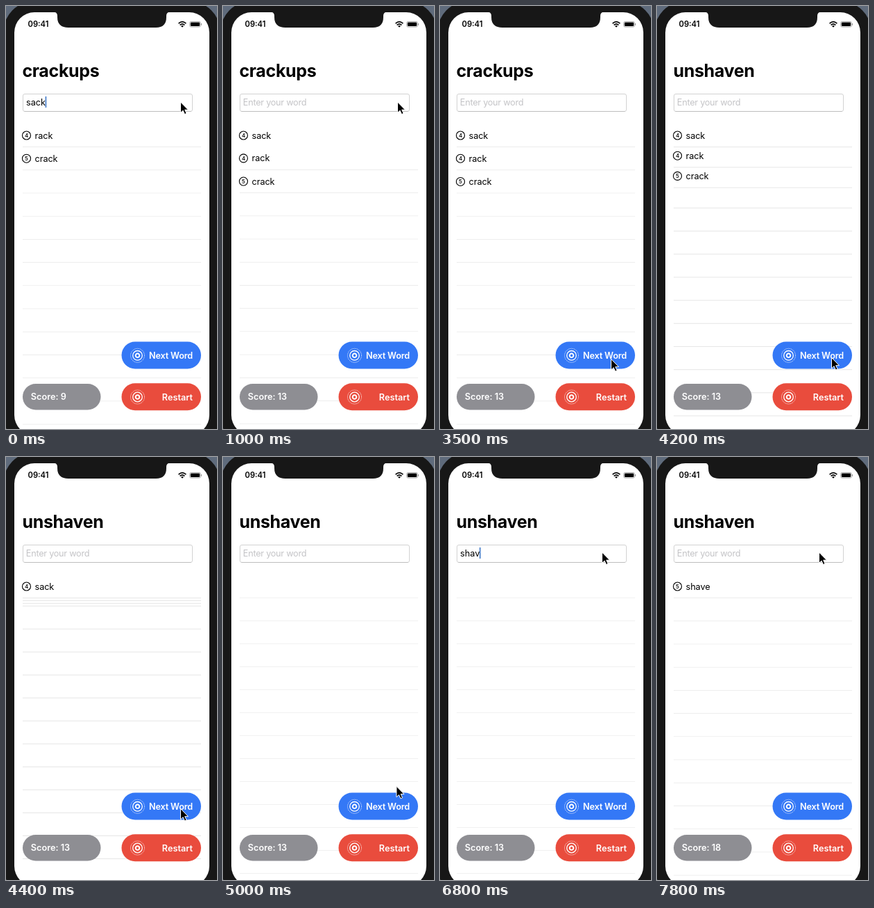
Recreate the animation shown at these times as an HTML page. Size 304 by 608 pixels, loop 8000 ms.

```html
<!DOCTYPE html>
<html lang="en">
<head>
<meta charset="utf-8">
<title>Word game</title>
<style>
  html, body { margin: 0; width: 100%; height: 100%; overflow: hidden; background: #5f6b7c; }
  svg { display: block; width: 304px; height: 608px; }
  text { font: 12.7px Inter, "Open Sans", sans-serif; white-space: pre; }
  #title { font-size: 25px; font-weight: 700; letter-spacing: -.32px; }
  #hint { fill: #c4c4c7; letter-spacing: -.26px; }
  .label { fill: #fff; font-weight: 600; }
  .end { text-anchor: end; }
  .badge { font-size: 8px; font-weight: 500; text-anchor: middle; }
  .ring { fill: none; stroke: #fff; }
</style>
</head>
<body>
<svg viewBox="0 0 304 608">
  <defs>
    <g id="target" class="ring">
      <circle r="2.8" stroke-width="1.9"/>
      <circle r="6.8" stroke-width="1.3"/>
      <circle r="10" stroke-width="1" stroke-dasharray="1 1.1"/>
    </g>
  </defs>
  <rect width="304" height="608" fill="#5f6b7c"/>
  <rect x="-4" y="-7" width="313" height="640" rx="45" fill="#171717"/>
  <rect x="12" y="9" width="281" height="608" rx="29" fill="#fff"/>
  <path d="M68 8Q74 9 74 14V16Q74 31 90 31H216Q231 31 231 16V14Q231 9 237 8Z" fill="#171717"/>

  <text x="31.5" y="30.4" style="font-size:11.2px;font-weight:600">09:41</text>
  <g fill="none" stroke="#000" stroke-width="1.7">
    <path d="M248.6 25.1Q254 20.3 259.4 25.1M250.6 27.3Q254 24.3 257.4 27.3"/>
    <path d="M254 30.8L252 28.8Q254 27.2 256 28.8Z" fill="#000" stroke="none"/>
    <rect x="264.6" y="22.4" width="15.8" height="7.8" rx="2.2" stroke="#999" stroke-width=".8"/>
    <rect x="265.8" y="23.6" width="13.4" height="5.4" rx="1.2" fill="#000" stroke="none"/>
    <path d="M281.6 25v2.6" stroke="#999" stroke-width="1"/>
  </g>

  <text id="title" x="23.4" y="102"></text>
  <rect x="24.5" y="126.5" width="244" height="25" rx="2.5" fill="#fff" stroke="#d2d2d2"/>
  <path d="M26.5 151.5h240" stroke="#bdbdbd"/>
  <text id="hint" x="28.8" y="143">Enter your word</text>
  <text id="entry" x="29" y="143"></text>
  <rect id="caret" y="130" width="1.6" height="16" fill="#3f78c8"/>

  <g id="list"></g>

  <rect x="166.5" y="482.5" width="114.5" height="39" rx="19.5" fill="#3478f6"/>
  <use href="#target" x="189.5" y="502.3"/>
  <text class="label end" x="269" y="507" letter-spacing="-.18">Next Word</text>
  <rect x="166.5" y="542.3" width="114.5" height="39" rx="19.5" fill="#e94c3d"/>
  <use href="#target" x="189.5" y="562"/>
  <text class="label end" x="269" y="566.5">Restart</text>
  <rect x="24" y="543" width="112.5" height="37.5" rx="18.75" fill="#8e8e93"/>
  <text id="score" class="label" x="35.8" y="566"></text>

  <path id="mouse" d="M0 0V15.4L3.6 12.2L6 17.6L8.6 16.4L6.2 11.2H11Z" fill="#000" stroke="#fff" stroke-width="1"/>
</svg>
<script>
const $ = id => document.getElementById(id);
const LOOP = 8000, TOP = 202.7, WIDE = 33.22, TIGHT = 33, ROWS = 17;
const ADD1 = 720, CLEAR = 4125, FOCUS = 5750, TYPE = 6100, ADD2 = 7120;

const unit = (t, start, length) => Math.max(0, Math.min(1, (t - start) / length));
const ease = u => u * u * (3 - 2 * u);
const mix = (a, b, p) => a + (b - a) * p;

// Mouse stops: time, x, y
const stops = [[0, 251.5, 138], [3050, 251.5, 138], [3480, 246.5, 507.5], [3600, 246.5, 507.5],
  [3900, 251.5, 505.5], [4850, 251.5, 505.5], [5680, 233.5, 137], [LOOP, 233.5, 137]];

function mouseAt(t) {
  const i = stops.findIndex(s => s[0] > t);
  const [a, b] = [stops[i - 1], stops[i]];
  const p = ease(unit(t, a[0], b[0] - a[0]));
  return [mix(a[1], b[1], p), mix(a[2], b[2], p)];
}

function row(y, word, line) {
  const content = word ? `<circle cx="29.5" cy="${y - 16.7}" r="6" fill="none" stroke="#000" stroke-width="1.1"/>
    <text class="badge" x="29.5" y="${y - 13.8}">${word.length}</text>
    <text x="41.6" y="${y - 12.2}" letter-spacing="-.1">${word}</text>` : '';
  return `<rect x="22" y="${y - 33}" width="259" height="33" fill="#fff"/>${content}` +
    (line ? `<path d="M24 ${y}H281" stroke="#e6e6e6"/>` : '');
}

function list(t) {
  let words = [], place = k => TOP + TIGHT * k, bare = false, reverse = false;
  const insert = (start, pitch) => {
    const p = ease(unit(t, start, 300));
    place = k => mix(TOP + pitch * Math.max(0, k - 1), TOP + WIDE * k, p);
    bare = t < start + 400;
  };
  if (t < ADD1) {
    words = ['rack', 'crack'];
    place = k => TOP + WIDE * k;
  } else if (t < CLEAR + 350) {
    words = ['sack', 'rack', 'crack'];
    if (t < CLEAR) insert(ADD1, WIDE);
    else {
      // Rows slide up and tuck in under the first one
      const p = ease(unit(t, CLEAR, 350));
      place = k => mix(TOP + WIDE * k, TOP + TIGHT * Math.max(0, k - 3), p);
      reverse = true;
    }
  } else if (t >= ADD2) {
    words = ['shave'];
    insert(ADD2, TIGHT);
  }
  const rows = Array.from({ length: ROWS }, (_, k) => row(place(k), words[k], k || !bare));
  return (reverse ? rows.reverse() : rows).join('');
}

function draw() {
  const t = performance.now() % LOOP;
  const typed = Math.floor((t - TYPE) / 200) + 1;
  const entry = t < ADD1 ? 'sack' : t < ADD2 ? 'shave'.slice(0, Math.max(0, typed)) : '';
  $('title').textContent = t < CLEAR - 25 ? 'crackups' : 'unshaven';
  $('score').textContent = 'Score: ' + (t < ADD1 ? 9 : t < ADD2 ? 13 : 18);
  $('entry').textContent = entry;
  $('hint').style.display = entry ? 'none' : '';
  $('caret').setAttribute('x', 29.2 + (entry ? $('entry').getComputedTextLength() - .6 : 0));
  $('caret').setAttribute('opacity', t < ADD1 ? 1 - unit(t, 200, 250) : +(t >= FOCUS && t < ADD2));
  $('list').innerHTML = list(t);
  $('mouse').setAttribute('transform', `translate(${mouseAt(t)})`);
  requestAnimationFrame(draw);
}
draw();
</script>
</body>
</html>
```
